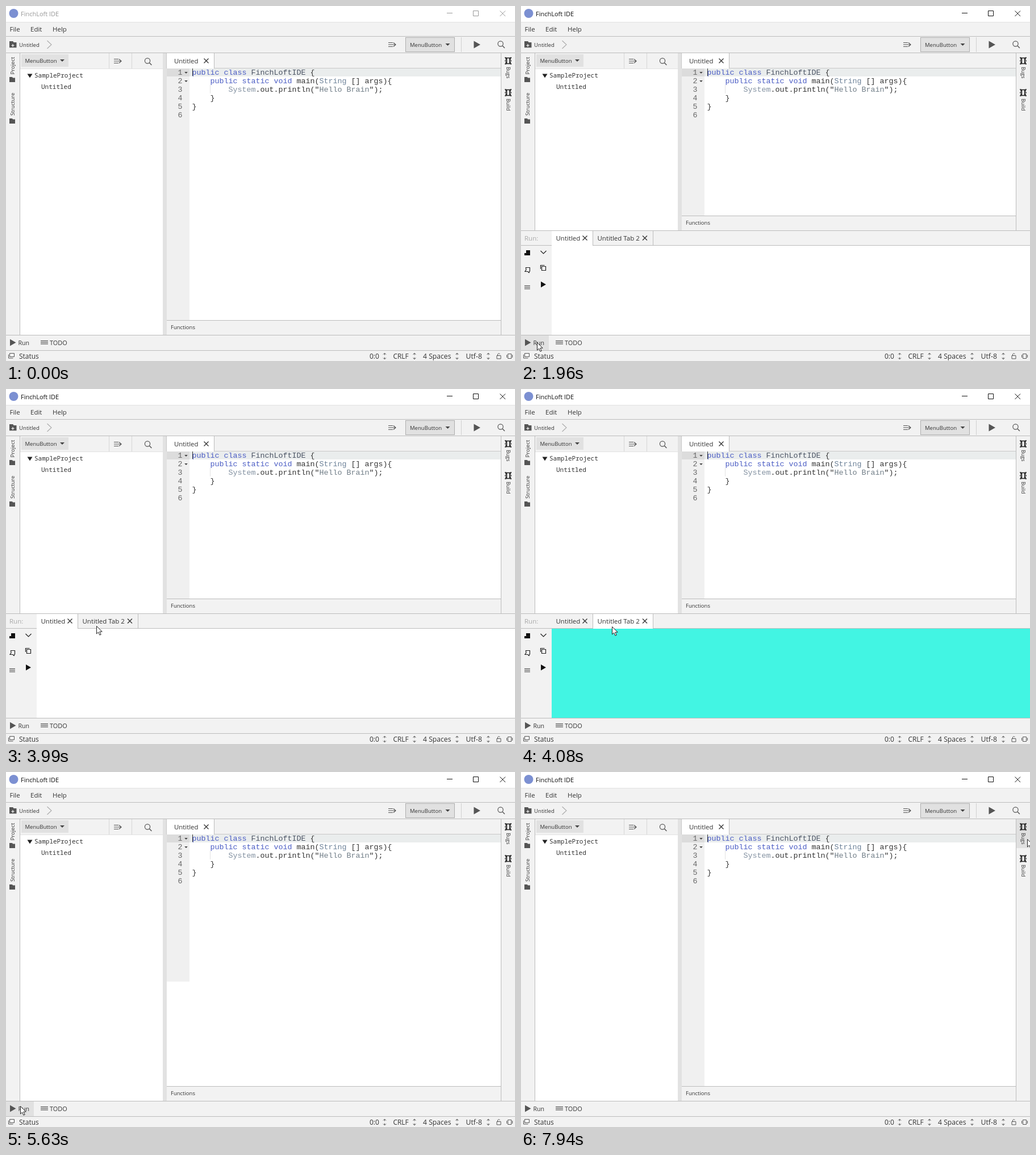
Recreate the animation shown at these times as an HTML page. Size 896x625 px, loop 8000 ms.

```html
<!DOCTYPE html>
<html lang="en">
<head>
<meta charset="utf-8">
<title>FinchLoft IDE</title>
<style>
html, body { margin: 0; width: 100%; height: 100%; overflow: hidden; background: #fff; }
svg { display: block; width: 896px; height: 625px; }
text { font-family: "Open Sans", "Noto Sans", sans-serif; fill: #333; white-space: pre; }
.code { font-family: "Liberation Mono", "Courier New", monospace; }
.tree { font-family: "Noto Sans Mono", "DejaVu Sans Mono", monospace; }
</style>
</head>
<body>
<svg id="stage" viewBox="0 0 896 625" xmlns="http://www.w3.org/2000/svg"></svg>
<script>
const BG = '#f2f2f2', LINE = '#bcbcbc', INK = '#555';
const LOOP = 8000;

const rect = (x, y, w, h, fill, more = '') =>
  `<rect x="${x}" y="${y}" width="${w}" height="${h}" fill="${fill}" ${more}/>`;
const hline = (x, y, w, c = LINE) => rect(x, y, w, 1, c);
const vline = (x, y, h, c = LINE) => rect(x, y, 1, h, c);
const text = (x, y, size, s, more = '') =>
  `<text x="${x}" y="${y}" font-size="${size}" ${more}>${s}</text>`;
const fill = (d, c = INK, more = '') => `<path d="${d}" fill="${c}" ${more}/>`;
const stroke = (d, c = INK, w = 1) => `<path d="${d}" fill="none" stroke="${c}" stroke-width="${w}"/>`;
const group = (id, body) => `<g id="${id}">${body}</g>`;

const cross = (x, y, r = 4) =>
  stroke(`M${x - r} ${y - r}l${2 * r} ${2 * r}m0 ${-2 * r}l${-2 * r} ${2 * r}`, '#333', 1.3);
const down = (x, y, r = 4) => fill(`M${x - r} ${y - r / 2}h${2 * r}l${-r} ${r}z`, '#444');
const play = (x, y, w, h, c = INK) => fill(`M${x} ${y}l${w} ${h / 2}l${-w} ${h / 2}z`, c);
const listArrow = (x, y) =>
  stroke(`M${x} ${y}h8M${x} ${y + 3.5}h13M${x} ${y + 7}h8M${x + 9} ${y}l4 3.5l-4 3.5`, '#555', 1.2);
const search = (x, y) =>
  `<circle cx="${x}" cy="${y}" r="4.6" fill="none" stroke="${INK}" stroke-width="1.2"/>` +
  stroke(`M${x + 3.4} ${y + 3.4}l4 4`, INK, 1.4);
const folder = (x, y, s = 1) => fill(`M${x} ${y}h${5 * s}l${s} ${1.5 * s}h${4 * s}v${7.5 * s}h${-10 * s}z`);
const updown = (x, y) => stroke(`M${x - 2.5} ${y - 3}l2.5 -2.5l2.5 2.5M${x - 2.5} ${y + 3}l2.5 2.5l2.5 -2.5M${x} ${y - 5}v3m0 4v3`, INK);
const bars = (x, y, w) => [0, 2.7, 5.4].map(d => stroke(`M${x} ${y + d}h${w}`, INK, 1.2)).join('');
const chip = (x, y) =>
  stroke(`M${x + 3.5} ${y + 1.5}h5v10h-5zM${x} ${y + 1}h2v3h2m-4 2.5h4m-4 5.5h2v-3h2M${x + 12} ${y + 1}h-2v3h-2m4 2.5h-4m4 5.5h-2v-3h-2`, '#222', 1.4);
const turned = (x, y, deg, s, size) => text(0, 0, size, s, `transform="translate(${x} ${y}) rotate(${deg})"`);

function titleBar() {
  return rect(0, 0, 896, 28, '#fff') +
    '<circle cx="13.5" cy="13" r="8" fill="#7c90d2"/>' +
    group('title', text(26, 17.5, 11, 'FinchLoft IDE', 'style="fill:inherit"') +
      `<path d="M776 12.5h10M822.5 8.5h9v9h-9zM869.500 8.500l9.500 9.500m0 -9.500l-9.500 9.500" fill="none"/>`);
}

function toolBars() {
  return hline(0, 28, 896, '#e2e2e2') +
    text(6.5, 45, 11.5, 'File') + text(43, 45, 11.5, 'Edit') + text(82, 45, 11.5, 'Help') +
    hline(0, 53, 896) + folder(6, 62, 1.25) +
    stroke('M12 67v5m-2.500 -2.500h5', '#fff', 1.2) +
    text(23, 72, 9.65, 'Untitled') + stroke('M72.500 61l7.500 7l-7.500 7', '#aaa', 1.1) +
    listArrow(673, 64.5) +
    rect(703.5, 55.5, 86, 25, '#e1e1e1', 'stroke="#adadad"') +
    text(711, 72, 9.55, 'MenuButton') + down(777.5, 68) +
    vline(801, 55, 26, '#d0d0d0') + play(823.5, 61.5, 11.5, 13) + search(870.5, 66.5) +
    hline(0, 82, 896);
}

function sideStrips() {
  return turned(15, 120.5, -90, 'Project', 9.5) + folder(6, 125) +
    turned(15, 193, -90, 'Structure', 9.3) + folder(6, 198) +
    vline(24, 83, 497) + vline(871, 83, 497) +
    group('bugsHover', rect(872, 83, 24, 51, '#e0e0e0')) +
    chip(878, 90) + turned(881, 107, 90, 'Bugs', 9) +
    chip(878, 146) + turned(881, 163, 90, 'Build', 9);
}

function projectPane() {
  return rect(25, 110, 251, 470, '#fff') + rect(27, 85, 83, 22, '#e1e1e1') +
    text(33.5, 99.5, 9.55, 'MenuButton') + down(99, 96) +
    vline(181, 83, 27, '#d6d6d6') + vline(221, 83, 27, '#d6d6d6') +
    listArrow(190, 93.5) + search(249, 96.5) + hline(25, 110, 251, '#e2e2e2') +
    fill('M37.500 119.500h9l-4.500 7z', '#222') +
    text(50, 126, 11, 'SampleProject', 'class="tree"') +
    text(62, 146, 11, 'Untitled', 'class="tree"') +
    rect(276, 83, 7, 497, '#e2e2e2');
}

const KEY = '#4a5cc4', TYPE = '#6d8299', DARK = '#333';
const span = (c, s) => `<tspan fill="${c}">${s}</tspan>`;
const codeLines = [
  span(KEY, 'public class ') + span('#4a5363', 'FinchLoftIDE') + span(DARK, ' {'),
  span(KEY, '    public static void ') + span(DARK, 'main(') + span(TYPE, 'String') + span(DARK, ' [] args){'),
  span('#8391a1', '        System') + span(DARK, '.out.println(') + span('#333', '"') +
    span('#6f7c86', 'Hello Brain') + span(DARK, '");'),
  span(DARK, '    }'), span(DARK, '}'), ''
];

function editor() {
  return rect(283, 110, 588, 470, '#fff') +
    hline(283, 109, 588, '#c8c8c8') + rect(283, 83, 84, 27, '#fff') + vline(366, 83, 27) + vline(282, 83, 27, '#c8c8c8') +
    text(296, 101, 11.4, 'Untitled') + cross(352.5, 96.5) +
    rect(283, 110, 40, 443, '#f0f0f0', 'id="gutter"') +
    rect(283, 110, 40, 14, '#dcdcdc') + rect(323, 110, 548, 14, '#eaeded') +
    codeLines.map((s, i) => {
      const y = 121 + 15 * i;
      return text(310.5, y, 13.333, i + 1, 'class="code" text-anchor="end" style="fill:#666"') +
        text(327.5, y, 13.333, s, 'class="code" xml:space="preserve"');
    }).join('') +
    down(317, 117.5, 2.8) + down(317, 132.5, 2.8) +
    vline(359, 139, 15, '#e2e2e2') + vline(328, 110, 13, '#333') +
    group('functions', rect(283, 553, 588, 26, BG) + hline(283, 553, 588) + text(290, 569, 9.5, 'Functions'));
}

function runPanel() {
  return group('panel',
    rect(0, 395, 896, 185, BG) + hline(0, 395, 896) +
    rect(54, 421, 842, 159, '#fff', 'id="output"') + hline(0, 421, 896) +
    rect(54, 396, 72, 26, '#fff', 'id="tab1"') + rect(127, 396, 105, 26, '#fff', 'id="tab2"') +
    vline(126, 396, 25) + vline(232, 396, 25) +
    text(6, 412.5, 11.5, 'Run:', 'style="fill:#a8a8a8"') +
    text(61.5, 413, 11.5, 'Untitled') + cross(112.5, 408.5) +
    text(134.5, 413, 11.5, 'Untitled Tab 2') + cross(218, 408.5) +
    fill('M9 430h7v9h-10v-4h3z', '#111') + stroke('M34.500 431l5 5l5 -5', '#222', 1.2) +
    stroke('M8.500 460.500h7v6l-1.500 3l-2 -2h-5l2 -3z', '#222', 1.2) +
    stroke('M36.500 458.500h7v7h-7zM34.500 463v-6.500h7', '#222', 1.2) +
    bars(6, 492.5, 10) + play(35, 485, 9, 10.5, '#111'));
}

function bottomBars() {
  return rect(0, 580, 896, 45, BG) + hline(0, 579, 896) +
    group('runHover', rect(0, 580, 49, 26, '#e1e1e1')) +
    group('todoHover', rect(50, 580, 67, 26, '#e1e1e1')) +
    play(7, 586.5, 10.5, 12) + text(21.5, 596.5, 10.6, 'Run') +
    bars(61, 589.5, 13) + text(77, 596.5, 10.9, 'TODO') +
    hline(0, 606, 896) +
    stroke('M6.500 611.500h8v6h-8zM4.500 613.500v6.500h8', INK) + text(23, 621, 12, 'Status') +
    text(640, 621, 12, '0:0') + updown(666.5, 616.5) +
    text(681.5, 621, 11.9, 'CRLF') + updown(719, 616.5) +
    text(734, 621, 12.2, '4 Spaces') + updown(794, 616.5) +
    text(809.5, 621, 12.3, 'Utf-8') + updown(849, 616.5) +
    stroke('M864 615.500h7v5.500h-7zM865.500 615.500v-2.500q2 -3 4 0', INK) +
    stroke('M883.500 612.500h6v8h-6zM881.500 614v5M891.500 614v5', INK);
}

document.getElementById('stage').innerHTML =
  rect(0, 0, 896, 625, BG) + titleBar() + toolBars() + projectPane() + editor() + sideStrips() + runPanel() + bottomBars() +
  group('arrow', fill('M0.500 0.500v13.500l3.100 -3l2.300 5.200l2.300 -1l-2.300 -5h4.300z', '#fff', 'stroke="#222"')) +
  group('beam', stroke('M-3 -6q2.500 0 3 1q0.500 -1 3 -1M0 -5v10M-3 6q2.500 0 3 -1q0.500 1 3 1', '#222'));

const el = {};
document.querySelectorAll('[id]').forEach(e => el[e.id] = e);

// Pointer moves: first step time, last step time, step count, points passed.
const moves = [
  [230, 320, 2, [637, 554], [600, 541], [563, 528]],
  [550, 1100, 8, [563, 528], [400, 592], [220, 608], [77, 592]],
  [1250, 1640, 6, [77, 592], [28, 592]],
  [3290, 3750, 7, [28, 592], [158, 416]],
  [3920, 4080, 3, [158, 416], [160, 418]],
  [4310, 4460, 3, [160, 418], [105, 408]],
  [4620, 4930, 5, [105, 408], [3, 607]],
  [5230, 5480, 4, [3, 607], [25, 588]],
  [5730, 6410, 10, [25, 588], [291, 571]],
  [6950, 7180, 4, [291, 571], [600, 273]],
  [7330, 7720, 6, [600, 273], [879, 107]],
  [7940, 7941, 1, [879, 107], [891, 118]]
];

function along(pts, p) {
  const f = p * (pts.length - 1), i = Math.min(Math.floor(f), pts.length - 2);
  return [0, 1].map(k => pts[i][k] + (pts[i + 1][k] - pts[i][k]) * (f - i));
}

function pointer(t) {
  const move = moves.filter(m => t >= m[0]).pop();
  if (!move) return null;
  const [t0, t1, n, ...pts] = move;
  const step = Math.min(n, 1 + Math.floor((t - t0) / (t1 - t0) * (n - 1) + 0.02));
  const s = step / n;
  return along(pts, n > 2 ? s + 0.5 * s * (1 - s) * (2 * s - 1) * -1 : s).map(Math.round);
}

const show = (e, on) => e.setAttribute('display', on ? 'inline' : 'none');
const set = (e, k, v) => e.setAttribute(k, v);

function draw(t) {
  const active = t >= 1720;
  const open = (t >= 1960 && t < 2740) || (t >= 3200 && t < 5630);
  const second = t >= 4080 && t < 4540;
  const p = pointer(t);
  const over = (x, y, w, h) => p && p[0] >= x && p[0] < x + w && p[1] >= y && p[1] < y + h;

  set(el.title, 'fill', active ? '#111' : '#999');
  set(el.title, 'stroke', 'none');
  set(el.title.querySelector('path'), 'stroke', active ? '#111' : '#999');

  show(el.panel, open);
  set(el.functions, 'transform', `translate(0 ${open ? -184 : 0})`);
  set(el.gutter, 'height', open || (t >= 5630 && t < 5730) ? 259 : 443);
  set(el.output, 'fill', second ? '#42f5e3' : '#fff');
  set(el.output, 'y', second ? 422 : 421);
  set(el.tab1, 'fill', second ? BG : '#fff');
  set(el.tab2, 'fill', second ? '#fff' : BG);
  set(el.tab1, 'height', second ? 25 : 26);
  set(el.tab2, 'height', second ? 26 : 25);

  show(el.runHover, over(0, 580, 49, 26));
  show(el.todoHover, over(50, 580, 67, 26));
  show(el.bugsHover, over(872, 83, 24, 51));

  const typing = over(323, 110, 548, open ? 259 : 443);
  show(el.arrow, p && !typing);
  show(el.beam, p && typing);
  if (p) set(typing ? el.beam : el.arrow, 'transform', `translate(${p[0]} ${p[1]})`);
}

const start = performance.now();
function tick() {
  draw((performance.now() - start) % LOOP);
  requestAnimationFrame(tick);
}
draw(0);
requestAnimationFrame(tick);
</script>
</body>
</html>
```
